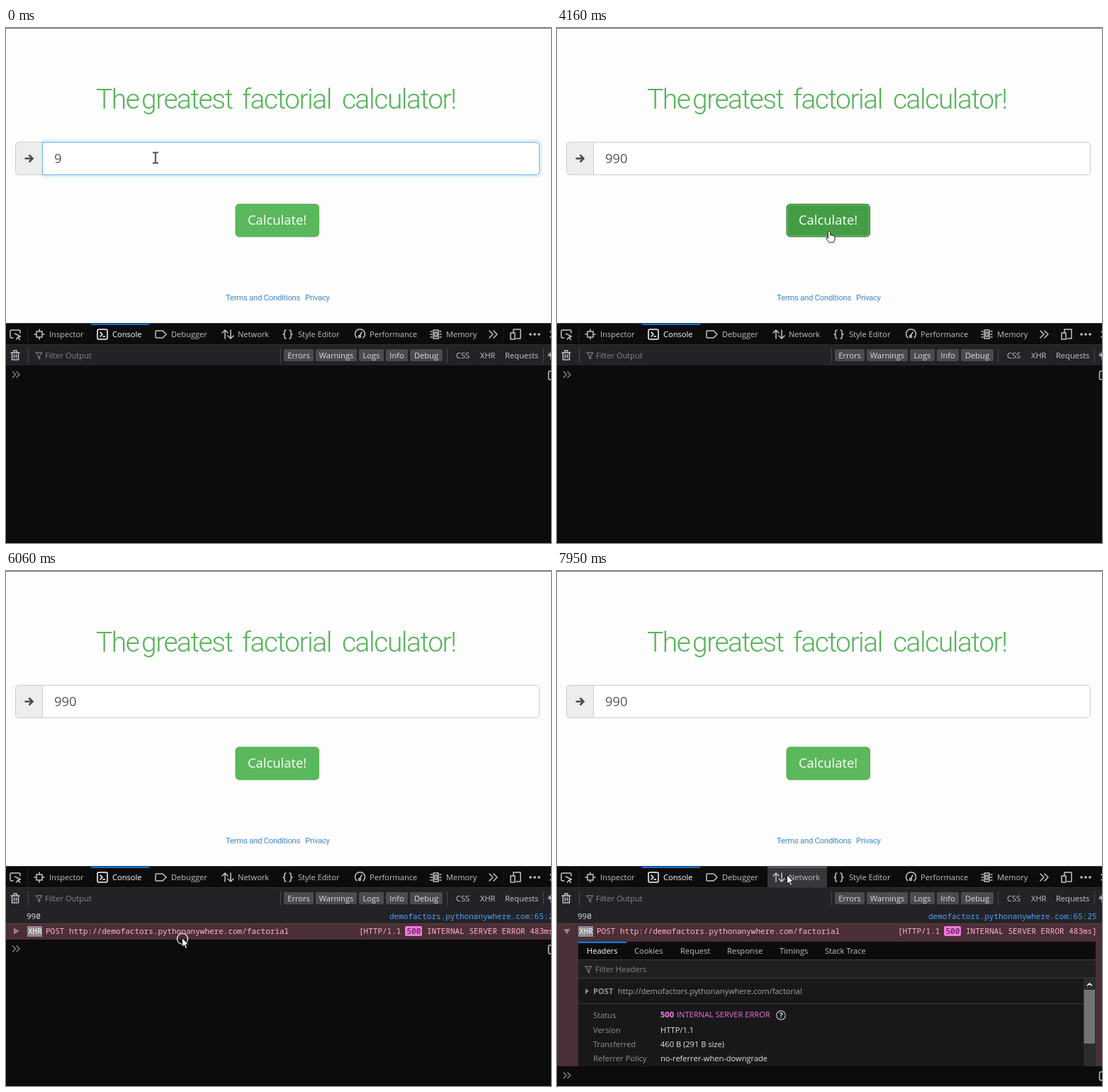
Recreate the animation shown at these times as an HTML page. Size 769 px wide and 728 px high, loop 8000 ms.

```html
<!DOCTYPE html>
<html lang="en">
<head>
<meta charset="utf-8">
<title>Factorial calculator</title>
<style>
  html, body { margin: 0; width: 100%; height: 100%; overflow: hidden; background: #fdfdfd; }
  svg { display: block; width: 769px; height: 728px; font: 11.1px "Open Sans", "Noto Sans", sans-serif; }
  text { white-space: pre; }
  .title { font: 300 39px Roboto, sans-serif; letter-spacing: -1.5px; fill: #56b45a; }
  .link { font: 11.5px Roboto, sans-serif; letter-spacing: -.35px; fill: #428bca; }
  .big { font-size: 18.4px; }
  .mono { font: 11px "Noto Sans Mono", "DejaVu Sans Mono", monospace; }
  .bold { font-weight: 700; }
  .icon { fill: none; stroke: #c4c4c8; stroke-width: 1.5; stroke-linejoin: round; stroke-linecap: round; }
</style>
</head>
<body>
<svg id="stage" viewBox="0 0 769 728"></svg>
<script>
const LOOP = 8000;
const HOST = 'demofactors.pythonanywhere.com';
const URL_TEXT = `http://${HOST}/factorial`;

const rect = (x, y, w, h, fill, extra = '') =>
  `<rect x="${x}" y="${y}" width="${w}" height="${h}" fill="${fill}" ${extra}/>`;
const text = (x, y, str, fill = '#c6c6ca', cls = '') =>
  `<text x="${x}" y="${y}" fill="${fill}" class="${cls}">${str}</text>`;
const icon = (x, y, d, extra = '') =>
  `<path class="icon" transform="translate(${x} ${y})" d="${d}" ${extra}/>`;
const group = (id, content, extra = '') => `<g id="${id}" ${extra}>${content}</g>`;

const page = () => [
  rect(0, 0, 769, 418, '#fdfdfd'),
  rect(0, 0, 769, 1, '#77777a'),
  ...[[127, 'The'], [191, 'greatest'], [333, 'factorial'], [474, 'calculator!']]
    .map(([x, word]) => text(x, 114, word, '', 'title')),
  group('glow', rect(49, 159, 706, 51, 'none', 'rx="7" stroke="#e3f0fa" stroke-width="4"')),
  `<path d="M51.500 161.500H18.500Q13.500 161.500 13.500 166.500V202.500Q13.500 207.500 18.500 207.500H51.500Z" fill="#eceeee" stroke="#ccc"/>`,
  `<path id="field" d="M51.500 161.500H747Q752.500 161.500 752.500 167V202Q752.500 207.500 747 207.500H51.500Z" fill="#fff"/>`,
  `<path d="M26.500 184.500H37M32.500 179.500L37.500 184.500 32.500 189.500" fill="none" stroke="#4b4b4b" stroke-width="2.600"/>`,
  `<text id="value" class="big" x="68" y="191" fill="#555"></text>`,
  `<rect id="caret" y="172" width="1" height="25" fill="#333"/>`,
  `<rect id="button" x="324" y="249" width="117.500" height="46" rx="5"/>`,
  group('ring', rect(325.5, 250.5, 114.5, 43, 'none', 'rx="4" stroke="#6bbd6b"')),
  text(341, 278, 'Calculate!', '#fff', 'big'),
  text(310, 385, 'Terms and Conditions', '', 'link'),
  text(422, 385, 'Privacy', '', 'link')
].join('');

const tabs = [[61, 'Inspector'], [150, 'Console'], [233, 'Debugger'], [327, 'Network'],
  [412, 'Style Editor'], [513, 'Performance'], [621, 'Memory']];
const pills = [[392, 42, 'Errors'], [437, 58, 'Warnings'], [498, 35, 'Logs'], [536, 31, 'Info'], [570, 46, 'Debug']];
const funnel = (x, y) => icon(x, y, 'M0 0H9L5.500 4.500V9L3.500 7.500V4.500Z', 'style="stroke-width:1;stroke:#929296"');

const toolbar = () => [
  rect(0, 417, 769, 311, '#0c0c0d'),
  rect(0, 417, 769, 1, '#38383d'),
  group('debuggerHover', rect(202, 418, 95, 29, '#252528')),
  group('networkHover', rect(297, 418, 84, 29, '#37373b') + rect(297, 418, 84, 1.5, '#6a6a6e')),
  rect(120, 418, 82, 2, '#0a70d4'),
  rect(30, 422, 1, 22, '#28282b'),
  rect(701, 422, 1, 22, '#18181b'),
  icon(6, 427, 'M4 11H1.500Q0 11 0 9.500V1.500Q0 0 1.500 0H12.500Q14 0 14 1.500V4M6.500 5L14.500 9 11 10 13.500 13.500M11 10L8.500 13Z'),
  icon(40, 426, 'M3 3H11V11H3ZM7 0V3M7 11V14M0 7H3M11 7H14'),
  icon(129, 426, 'M2 0H12Q14 0 14 2V12Q14 14 12 14H2Q0 14 0 12V2Q0 0 2 0ZM4 4L7 7 4 10M8 10H10.500', 'style="stroke:#fff"'),
  icon(211, 428, 'M1 0H10L15 5 10 10H1Q0 10 0 9V1Q0 0 1 0Z'),
  icon(305, 426, 'M4 13V1M0 5L4 1 8 5M12 1V13M8 9L12 13 16 9'),
  icon(391, 427, 'M4 0Q2 0 2 2V4Q2 6 0 6 2 6 2 8V10Q2 12 4 12M9 0Q11 0 11 2V4Q11 6 13 6 11 6 11 8V10Q11 12 9 12'),
  icon(492, 426, 'M3 12A7 7 0 1 1 12 12M7 9L10 4M5.500 10A1.500 1.500 0 1 0 8.500 10A1.500 1.500 0 1 0 5.500 10'),
  icon(599, 426, 'M4 1H11V13H4ZM6 4H9V10H6ZM0 3H2M0 7H2M0 11H2M13 3H15M13 7H15M13 11H15'),
  icon(682, 428, 'M0 0L5 5 0 10M6 0L11 5 6 10'),
  icon(712, 426, 'M4 5V0H14V13H8M0 5H6V14H0Z'),
  ...[740, 746, 752].map(x => `<circle cx="${x}" cy="433" r="1.800" fill="#c4c4c8"/>`),
  icon(768, 429, 'M0 0L8 8M8 0L0 8'),
  ...tabs.map(([x, label]) => text(x, 437, label, label === 'Console' ? '#fff' : '#c0c0c4')),
  rect(0, 447, 769, 30, '#232327'),
  rect(0, 447, 769, 1, '#303034'),
  icon(7, 456, 'M0 3H12M4 3V0H8V3M1.500 3V13H10.500V3M4.500 6V10M7.500 6V10'),
  funnel(42, 459),
  text(55, 467, 'Filter Output', '#85858a'),
  ...[31, 387, 622, 758].map(x => rect(x, 453, 1, 20, '#48484d')),
  ...pills.map(([x, w, label]) => rect(x, 454, w, 17, '#4a4a4f', 'rx="2"') +
    `<text x="${x + w / 2}" y="467" fill="#dedee2" text-anchor="middle">${label}</text>`),
  text(635, 467, 'CSS'), text(669, 467, 'XHR'), text(704, 467, 'Requests'),
  icon(765, 458, 'M4 0V10M0 5H9M1 2L8 8')
].join('');

const details = [
  [649, 'Version', 'HTTP/1.1'],
  [669, 'Transferred', '460 B (291 B size)'],
  [689, 'Referrer Policy', 'no-referrer-when-downgrade']
];

const headers = () => [
  rect(30, 550, 730, 25, '#202023'),
  rect(30, 575, 730, 1, '#38383d'),
  funnel(40, 559),
  text(54, 567, 'Filter Headers', '#85858a'),
  '<path d="M40 590L45 594 40 598Z" fill="#85858a"/>',
  text(51, 598, 'POST', '#939397', 'bold'),
  text(86, 598, URL_TEXT, '#a8a8ac'),
  rect(30, 611, 713, 1, '#38383d'),
  text(51, 632, 'Status', '#939397'),
  text(146, 631, '500', '#ff7de9', 'bold'),
  text(169, 631, 'INTERNAL SERVER ERROR', '#e870d8'),
  '<circle cx="316" cy="628" r="6.300" fill="none" stroke="#b8b8bc" stroke-width="1.200"/>',
  text(313.5, 632, '?', '#d0d0d4', 'bold'),
  ...details.map(([y, name, value]) => text(51, y + 4, name, '#939397') + text(146, y + 4, value, '#e4e4e8')),
  rect(743, 576, 17, 124, '#2b2b2d'),
  icon(748.5, 582, 'M0 4L3 1 6 4', 'style="stroke:#fff"'),
  '<rect id="thumb" x="743.500" y="592" width="15.500" fill="#737375"/>'
].join('');

const requestPanel = () => [
  rect(30, 524, 730, 176, '#18181a'),
  rect(30, 524, 730, 26, '#0c0c0d'),
  rect(30, 549, 730, 1, '#38383d'),
  rect(30, 524, 68, 2, '#0a84ff'),
  ...[[42, 'Headers'], [109, 'Cookies'], [174, 'Request'], [240, 'Response'], [314, 'Timings'], [378, 'Stack Trace']]
    .map(([x, label], i) => text(x, 541, label, i ? '#c0c0c4' : '#fff')),
  group('empty', '<text x="395" y="685" text-anchor="middle" fill="#7b7b7f" style="font-size:15.400px">No headers for this request</text>'),
  group('headers', headers())
].join('');

const consoleRows = () => [
  group('log', rect(0, 477, 769, 21, '#232327') + text(29, 492, '990', '#d7d7db', 'mono') +
    group('logLink', text(524, 492, `${HOST}:65:25`, '#4f9ff5', 'mono'))),
  group('error',
    '<rect id="errorFill" y="498" width="769" fill="#4b2f36"/>' +
    rect(0, 498, 769, 1, '#6a3a48') +
    '<path id="twisty" d="M-3 -4.500L4.500 0 -3 4.500Z" fill="#9b8086"/>' +
    rect(30, 502, 21, 15, '#8c8c90') + text(31, 513, 'XHR', '#fff', 'mono') +
    text(56, 513, `POST ${URL_TEXT}`, '#ffb3d2', 'mono') +
    group('status', text(481, 513, '[HTTP/1.1', '#ffb3d2', 'mono') +
      rect(546, 502, 24, 14, '#f576e2', 'rx="2"') + text(548.5, 513, '500', '#3a1734', 'mono') +
      text(577, 513, 'INTERNAL SERVER ERROR 483ms]', '#ffb3d2', 'mono'))),
  group('panel', requestPanel()),
  group('prompt', icon(9.5, -4, 'M0 0L4 4 0 8M5.500 0L9.500 4 5.500 8', 'style="stroke:#85858a"') +
    icon(765.5, -5, 'M6 0H2Q0 0 0 2V10Q0 12 2 12H6'))
].join('');

const beam = 'M-4 -7.500H-1L0 -6.500 1 -7.500H4M0 -6.500V6.500M-4 7.500H-1L0 6.500 1 7.500H4';
const pointers = [
  group('beam', `<path d="${beam}" fill="none" stroke="#999" stroke-width="2.500"/><path d="${beam}" fill="none" stroke="#333"/>`),
  group('arrow', '<path d="M.500 .500V13.500L3.400 10.800 5.400 15.500 7.600 14.500 5.600 10H9.500Z" fill="#fff" stroke="#111"/>'),
  group('hand', '<path d="M-1.500 9V1.500Q0 -1 1.500 1.500V6Q3 5 4 6.500 5.500 5.500 6.200 7 8 6.300 8 8.500V12L6.500 16H0L-4.500 10.500Q-4 8 -1.500 10.500Z" fill="#fff" stroke="#222"/>')
].join('');

document.getElementById('stage').innerHTML = page() + toolbar() + consoleRows() +
  '<circle id="click" cx="249" cy="520" r="7.500" fill="none" stroke="#fff" stroke-width="1.200"/>' +
  group('pointer', pointers);

const $ = id => document.getElementById(id);
const show = (id, on) => { $(id).style.display = on ? '' : 'none'; };
const set = (id, name, value) => $(id).setAttribute(name, value);
const move = (id, x, y) => set(id, 'transform', `translate(${x} ${y})`);
const at = (steps, t) => steps.filter(step => step[0] <= t).pop();

// [start, text, caret visible]
const typing = [[0, '9', 0], [180, '9', 1], [430, '99', 1], [710, '99', 0], [1260, '99', 1], [1730, '99', 0],
  [2100, '9', 1], [2280, '9', 0], [2650, '99', 1], [2830, '99', 0], [2980, '990', 1], [3400, '990', 0]];

// [start, x, y, shape]
const pointerPath = [
  [0, 211, 183.5, 'beam'], [3660, 219, 228, 'arrow'], [3750, 254, 239, 'arrow'], [3840, 298, 254, 'arrow'],
  [3930, 340, 270, 'hand'], [4020, 368, 281, 'hand'], [4110, 384, 287, 'hand'], [4200, 389, 290, 'hand'],
  [4430, 360, 350, 'arrow'], [4520, 310, 430, 'arrow'], [4610, 268, 496, 'arrow'], [4700, 248, 529, 'arrow'],
  [4880, 0, 0, 'none'], [5610, 249, 531, 'beam'], [5870, 249, 522, 'arrow'], [5960, 248, 518, 'arrow'],
  [6240, 249, 514, 'arrow'], [6410, 250, 510, 'arrow'], [6590, 250, 508, 'arrow'],
  [7500, 254, 494, 'arrow'], [7590, 260, 468, 'arrow'], [7680, 271, 436, 'arrow'],
  [7770, 288, 411, 'arrow'], [7860, 309, 420, 'arrow'], [7950, 324, 429, 'arrow']];

function draw(t) {
  const [, value, caret] = at(typing, t);
  $('value').textContent = value;
  set('caret', 'x', 68.5 + 10.5 * value.length);
  show('caret', caret);

  const focused = t < 4160;
  show('glow', focused);
  set('field', 'stroke', focused ? '#66afe9' : '#ccc');
  const dark = t >= 3930 && t < 6060;
  set('button', 'fill', dark ? '#449d44' : '#5cb85c');
  set('button', 'stroke', dark ? '#2f7f2f' : '#4cae4c');
  show('ring', dark && !focused);

  const logged = t >= 4250, failed = t >= 4880, open = t >= 6680, loaded = t >= 6860;
  show('log', logged);
  show('error', failed);
  show('panel', open);
  show('empty', !loaded);
  show('headers', loaded);
  set('errorFill', 'height', open ? 202 : 23);
  set('thumb', 'height', t < 7040 ? 108 : 76);
  set('twisty', 'transform', `translate(14 509) rotate(${t < 6590 ? 0 : 90})`);
  for (const id of ['logLink', 'status']) move(id, open ? 0 : 17, 0);
  move('prompt', 0, open ? 713 : failed ? 534 : logged ? 511 : 490);

  const [, x, y, shape] = at(pointerPath, t);
  move('pointer', x, y);
  for (const id of ['beam', 'arrow', 'hand']) show(id, id === shape);
  show('click', t >= 6060 && t < 6400);
  set('click', 'opacity', Math.min(1, (6400 - t) / 240));
  const overTabs = y >= 418 && y < 447;
  show('debuggerHover', overTabs && x >= 202 && x < 297);
  show('networkHover', overTabs && x >= 297 && x < 381 && t > 7500);
}

const start = performance.now();
function frame() {
  draw((performance.now() - start) % LOOP);
  requestAnimationFrame(frame);
}
frame();
</script>
</body>
</html>
```
